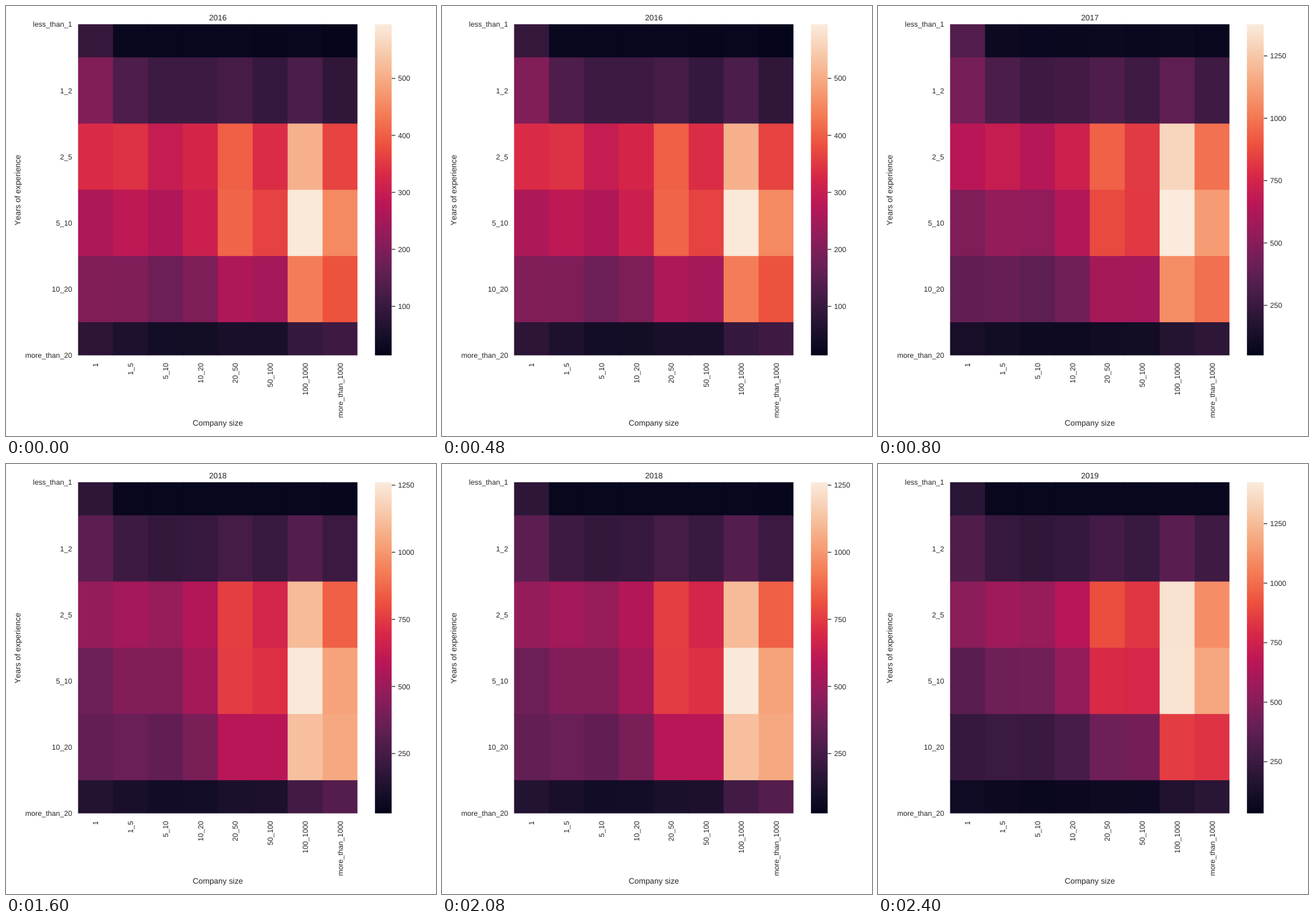
An HTML page for the animation above (3200 ms loop, 748x748 px).

```html
<!DOCTYPE html>
<html lang="en">
<head>
<meta charset="utf-8">
<title>Experience by company size</title>
<style>
  html, body { margin: 0; width: 100%; height: 100%; overflow: hidden; background: #fff; }
  svg { display: block; width: 100vw; height: 100vh; }
  text {
    font-family: "Liberation Sans", Arial, sans-serif;
    font-size: 12.65px;
    font-kerning: none;
    fill: #262626;
    text-rendering: geometricPrecision;
  }
  .big { font-size: 13.8px; }
  .mid { text-anchor: middle; }
  .end { text-anchor: end; }
  .year { visibility: hidden; animation: show 3200ms step-end infinite; }
  @keyframes show {
    0% { visibility: visible; }
    25%, 100% { visibility: hidden; }
  }
</style>
</head>
<body>
<svg id="chart" viewBox="0 0 748 748"></svg>
<script>
const svg = document.getElementById('chart');
const LEFT = 125.4, TOP = 31.7, COL = 60.75, ROW = 115.2;
const RIGHT = LEFT + 8 * COL, BOTTOM = TOP + 5 * ROW;

// Evenly spaced colour scale, low to high
const scale = ['03051a', '221331', '451c47', '6a1f56', '921c5b', 'b91657',
  'd92847', 'ed513e', 'f47c56', 'f6a47b', 'f7c9aa', 'faebdd'];

const sizes = ['1', '1_5', '5_10', '10_20', '20_50', '50_100', '100_1000', 'more_than_1000'];
const share = [32, 37, 36, 44, 62, 58, 100, 80];

// How each experience group departs from the common share:
// tilt and bend across sizes, and a boost for one-person companies
const groups = [
  { name: 'less_than_1', tilt: -0.8, bend: 0, solo: 7 },
  { name: '1_2', tilt: -0.55, bend: 0, solo: 1.5 },
  { name: '2_5', tilt: -0.24, bend: 0, solo: 1 },
  { name: '5_10', tilt: 0, bend: 0, solo: 1 },
  { name: '10_20', tilt: 0.05, bend: 0.25, solo: 1 },
  { name: 'more_than_20', tilt: -0.12, bend: 0.95, solo: 1 }
];

// lean: shift towards large companies; level: weight of each group
const years = [
  { name: 2016, min: 14, max: 595, step: 100, lean: -0.17, level: [0.024, 0.33, 1.14, 1.12, 0.7, 0.105] },
  { name: 2017, min: 49.5, max: 1377, step: 250, lean: 0, level: [0.043, 0.36, 1.12, 1, 0.65, 0.065] },
  { name: 2018, min: 27, max: 1261, step: 250, lean: 0.08, level: [0.026, 0.31, 0.98, 0.94, 0.71, 0.11] },
  { name: 2019, min: 33, max: 1424, step: 250, lean: 0.18, level: [0.026, 0.3, 1.02, 0.86, 0.44, 0.05] }
];

function percent(year, r, c) {
  const { tilt, bend, solo } = groups[r];
  const u = c / 3.5 - 1;
  const curve = Math.exp((tilt + year.lean) * u + bend * u * u);
  return Math.min(100, share[c] * year.level[r] * curve * (c ? 1 : solo));
}

function colour(p) {
  const pos = p / 100 * (scale.length - 1);
  const i = Math.min(scale.length - 2, Math.floor(pos));
  const mix = [0, 2, 4].map(j => {
    const [a, b] = [scale[i], scale[i + 1]].map(hex => parseInt(hex.slice(j, j + 2), 16));
    return Math.round(a + (b - a) * (pos - i));
  });
  return `rgb(${mix})`;
}

function add(parent, tag, attrs, content) {
  const el = document.createElementNS('http://www.w3.org/2000/svg', tag);
  for (const key in attrs) el.setAttribute(key, attrs[key]);
  if (content !== undefined) el.textContent = content;
  return parent.appendChild(el);
}

function label(parent, content, x, y, cls, turned) {
  const transform = `translate(${x} ${y})` + (turned ? ' rotate(-90)' : '');
  add(parent, 'text', { transform, class: cls }, content);
}

// Cells overlap the next ones by a pixel, so no seams show
function drawCell(g, r, c, fill) {
  const x = LEFT + c * COL, y = Math.max(TOP, TOP + (r - 0.5) * ROW);
  const width = Math.min(COL + 1, RIGHT - x);
  const height = Math.min(TOP + (r + 0.5) * ROW + 1, BOTTOM) - y;
  add(g, 'rect', { x, y, width, height, fill });
}

function drawYear(year, i) {
  const g = add(svg, 'g', { class: 'year', style: `animation-delay:${i * 800 - 3200}ms` });
  label(g, year.name, 368.5, 25.3, 'big mid');
  groups.forEach((_, r) => sizes.forEach((_, c) => drawCell(g, r, c, colour(percent(year, r, c)))));
  for (let v = year.step; v <= year.max; v += year.step) {
    const y = BOTTOM - (v - year.min) / (year.max - year.min) * (BOTTOM - TOP);
    add(g, 'path', { d: `M671 ${y}h6.2`, stroke: '#262626', 'stroke-width': 1.3 });
    label(g, v, 682, y + 4.6, '');
  }
}

const ramp = add(add(svg, 'defs'), 'linearGradient', { id: 'ramp', x1: 0, y1: 1, x2: 0, y2: 0 });
scale.forEach((hex, i) => add(ramp, 'stop', { offset: i / (scale.length - 1), 'stop-color': '#' + hex }));
add(svg, 'rect', { x: 641.8, y: TOP, width: 29, height: BOTTOM - TOP, fill: 'url(#ramp)' });

groups.forEach((group, r) => label(svg, group.name, 115, TOP + r * ROW + 4.6, 'end'));
sizes.forEach((size, c) => label(svg, size, LEFT + (c + 0.5) * COL + 4.5, 621, 'end', true));
label(svg, 'Company size', 368.5, 729.6, 'big mid');
label(svg, 'Years of experience', 25, 320.3, 'big mid', true);
years.forEach(drawYear);
</script>
</body>
</html>
```
